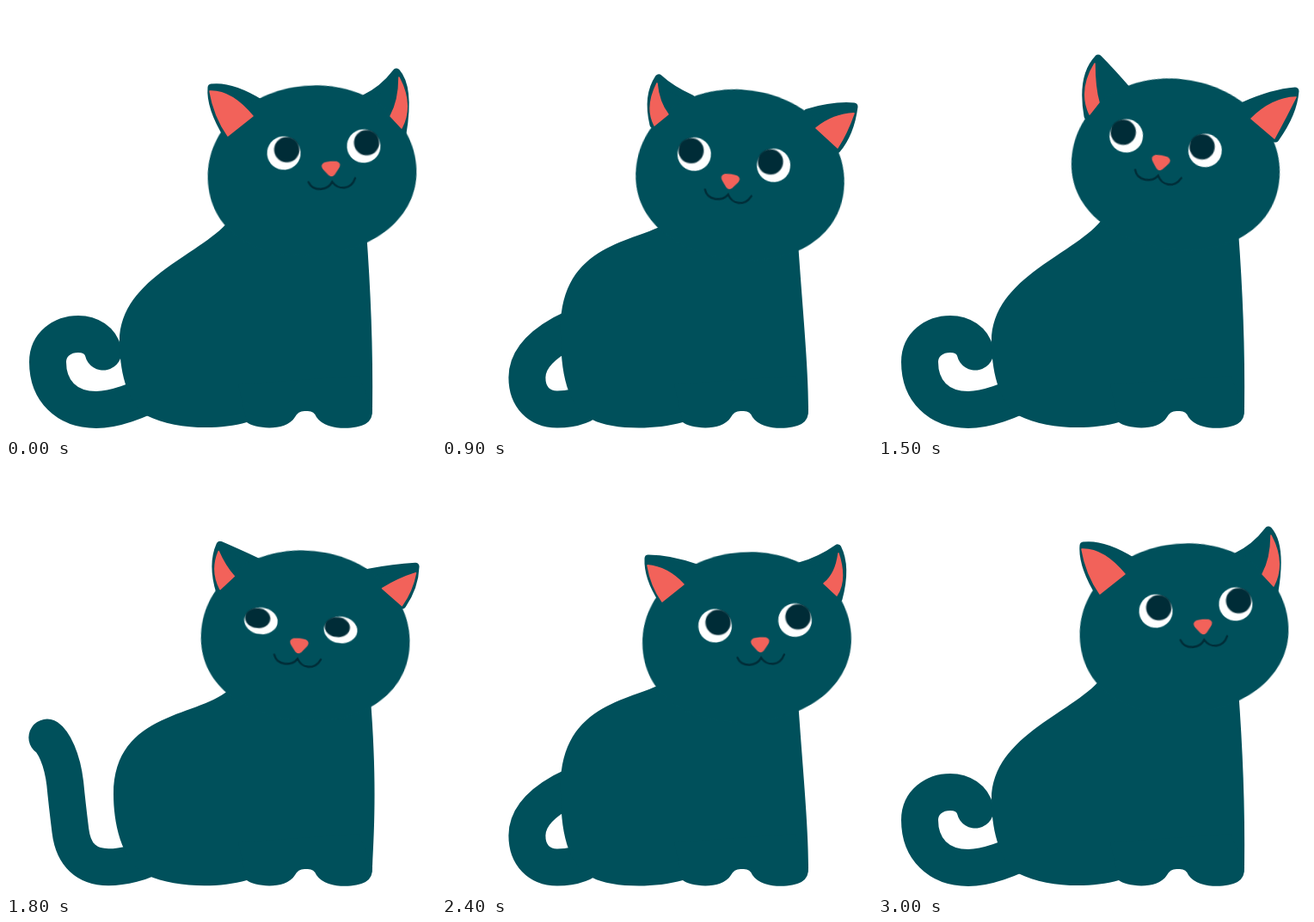
These frames come from a looping animation (500x500 px, 3050 ms). An HTML page without scripts:

```html
<!DOCTYPE html>
<html lang="en">
<head>
<meta charset="utf-8">
<title>Bouncing cat</title>
<style>
html, body { margin: 0; width: 100%; height: 100%; overflow: hidden; background: #fff; }
svg { display: block; width: 100vw; height: 100vh; }

.fur { fill: #00505b; }
.pink { fill: #f2625a; stroke: #f2625a; stroke-width: 1.5; stroke-linejoin: round; }
.dark { fill: #002c37; }
.white { fill: #fff; }
.line { fill: none; stroke: #002c37; stroke-linecap: round; }
#tail { fill: none; stroke: #00505b; stroke-width: 43; stroke-linecap: round; }
#ears { stroke: #00505b; stroke-width: 9; stroke-linejoin: round; }

/* default easing settles; keyframes that start a move override it */
#tail, #body, #head, #ears, #inner, #eyes, #muzzle, .pupil, .lid, .open, .shut {
  animation: 3.05s cubic-bezier(.2,.5,.4,1) infinite;
}
#tail { animation-name: tail; animation-timing-function: linear; }
#body { animation-name: body; }
#head { animation-name: head; }
#ears { animation-name: ears; }
#inner { animation-name: inner; }
#eyes { animation-name: eyes; }
#muzzle { animation-name: muzzle; }
.pupil { animation-name: pupil; animation-timing-function: ease-in-out; }
.lid { animation-name: lid; animation-timing-function: linear; }
.open { animation-name: open; animation-timing-function: step-end; }
.shut { animation-name: shut; animation-timing-function: step-end; }

@keyframes tail {
  0%, 49.18%, 98.361%, 100% { d: path("M175,447 C155,459 125,469.5 105,469.5 C70,469.5 48.5,447 48.5,414 C48.5,393 66,381.5 84,381.5 C98,381.5 110,389 113,402"); animation-timing-function: ease-in; }
  6.557%, 55.738% { d: path("M175,451 C158,463 124,469.5 108,469.5 C84,469.5 67,455 60,428 C55,408 48,390 46,368 C43,340 48,322 64,312"); }
  13.115%, 62.295% { d: path("M175,455 C160,465 145,468 130,468 C104,468 89.5,455 89.5,425 C89.5,405 93,395 91,375 C87,344 62,324 32,324"); }
  18.033%, 67.213% { d: path("M175,455 C160,465 150,469 133,469 C112,469 99.5,455 99.5,436 C99.5,412 118,403 126,385 C139,350 112,322 76,343"); }
  29.508%, 78.689% { d: path("M175,455 C165,465 150,469 134,469 C113,469 99,455 99,432 C99,412 115,395 140,381 C155,373 170,368 180,365"); }
  40.984%, 90.164% { d: path("M175,450 C158,462 128,470 110,470 C82,470 65.5,450 65.5,425 C65.5,396 88,371 112,371 C126,371 138,378 143,390"); animation-timing-function: ease-out; }
}
@keyframes body {
  0%, 49.18%, 98.361%, 100% { d: path("M300,220 L262,246 C233,288 132,314 132,390 C132,420 139,460 163,476 C195,492 245,494 280,484 L300,450 L400,450 L426,468 C427,400 424,330 419,262 Z"); animation-timing-function: cubic-bezier(.5,0,.75,.6); }
  13.115%, 62.295% { d: path("M300,220 L262,270 C225,300 120,265 120,380 C120,410 128,462 165,480 C195,492 245,494 280,484 L300,450 L400,450 L426,468 C430,430 436,385 427,275 Z"); }
  18.033%, 67.213% { d: path("M300,220 L262,272 C205,277 122,262 122,375 C122,415 136,462 170,481 C195,492 245,494 280,484 L300,450 L400,450 L426,468 C430,420 429,340 424,280 Z"); animation-timing-function: cubic-bezier(.45,0,.8,.7); }
  29.508%, 78.689% { d: path("M300,220 L262,252 C225,275 138,275 138,375 C138,410 140,465 175,481 C195,492 245,494 280,484 L300,450 L400,450 L426,468 C426,420 419,350 414,275 Z"); }
  40.984%, 90.164% { d: path("M300,220 L262,246 C233,288 132,314 132,390 C132,420 139,460 163,476 C195,492 245,494 280,484 L300,450 L400,450 L426,468 C427,400 424,330 419,262 Z"); }
}
@keyframes head {
  0%, 90.164%, 100% { transform: translate(356px,196px) rotate(-5deg); animation-timing-function: cubic-bezier(.5,0,.75,.6); }
  13.115% { transform: translate(354px,212.5px) rotate(-2deg); }
  18.033% { transform: translate(351px,216px) rotate(.5deg); animation-timing-function: cubic-bezier(.45,0,.8,.7); }
  29.508% { transform: translate(346.5px,201px) rotate(8deg); }
  40.984%, 49.18% { transform: translate(346px,188.5px) rotate(10deg); animation-timing-function: cubic-bezier(.5,0,.5,1); }
  67.213% { transform: translate(349.5px,215px) rotate(3deg); animation-timing-function: cubic-bezier(.45,0,.8,.7); }
  78.689% { transform: translate(354.5px,206px) rotate(-4deg); }
}
@keyframes ears {
  0%, 90.164%, 100% { d: path("M296,113 Q262,92 239,95 Q237,118 258,152 Z M416,108 Q438,98 454,77 Q470,95 461,148 Z"); animation-timing-function: cubic-bezier(.5,0,.75,.6); }
  13.115% { d: path("M292,126 Q265,122 241,119 Q240,140 252,165 Z M420,125 Q445,119 465,112 Q471,135 461,163 Z"); }
  18.033% { d: path("M293,126 Q267,122 243,118 Q241,141 252,164 Z M420,130 Q445,126 468,123 Q471,145 460,168 Z"); animation-timing-function: cubic-bezier(.45,0,.8,.7); }
  29.508% { d: path("M290,108 Q266,97 252,84 Q238,105 246,138 Z M425,124 Q455,115 479,117 Q475,148 459,167 Z"); }
  40.984%, 49.18% { d: path("M290,98 Q270,75 256,61 Q236,82 244,128 Z M425,116 Q459,101 485,99 Q483,125 462,154 Z"); animation-timing-function: cubic-bezier(.5,0,.5,1); }
  67.213% { d: path("M295,125 Q268,122 244,117 Q241,140 252,163 Z M420,133 Q445,134 470,133 Q470,155 460,171 Z"); animation-timing-function: cubic-bezier(.45,0,.8,.7); }
  78.689% { d: path("M296,121 Q265,110 240,110 Q239,132 256,158 Z M416,119 Q440,112 460,98 Q471,120 461,157 Z"); }
}
@keyframes inner {
  0%, 90.164%, 100% { d: path("M237,99 Q262,98 287,128 L258,151 Q242,128 237,99 Z M457,83 Q457,110 447,128 L460,142 Q474,115 457,83 Z"); animation-timing-function: cubic-bezier(.5,0,.75,.6); }
  13.115% { d: path("M240,127 Q258,130 276,145 L256,164 Q244,148 240,127 Z M465,120 Q455,138 441,145 L459,160 Q470,140 465,120 Z"); }
  18.033% { d: path("M242,126 Q257,131 274,144 L254,163 Q243,146 242,126 Z M468,131 Q455,144 440,150 L460,167 Q472,150 468,131 Z"); animation-timing-function: cubic-bezier(.45,0,.8,.7); }
  29.508% { d: path("M250,90 Q252,112 263,126 L247,139 Q236,118 250,90 Z M479,125 Q455,126 435,142 L460,165 Q471,148 479,125 Z"); }
  40.984%, 49.18% { d: path("M252,67 Q252,95 257,112 L246,126 Q233,98 252,67 Z M486,106 Q458,107 434,131 L461,154 Q474,130 486,106 Z"); animation-timing-function: cubic-bezier(.5,0,.5,1); }
  67.213% { d: path("M244,125 Q256,134 271,143 L251,159 Q241,142 244,125 Z M470,141 Q455,151 440,154 L460,172 Q472,158 470,141 Z"); animation-timing-function: cubic-bezier(.45,0,.8,.7); }
  78.689% { d: path("M239,118 Q262,120 281,140 L256,160 Q243,142 239,118 Z M461,104 Q458,128 444,139 L459,153 Q471,135 461,104 Z"); }
}
@keyframes eyes {
  0%, 90.164%, 100% { transform: translate(369.5px,167px) rotate(-5deg); animation-timing-function: cubic-bezier(.5,0,.75,.6); }
  13.115% { transform: translate(358.5px,197px) rotate(-2deg); }
  18.033% { transform: translate(355px,207px) rotate(.5deg); animation-timing-function: cubic-bezier(.45,0,.8,.7); }
  29.508% { transform: translate(339.5px,179px) rotate(8deg); }
  40.984%, 49.18% { transform: translate(334.5px,159.5px) rotate(10.5deg); animation-timing-function: cubic-bezier(.5,0,.5,1); }
  67.213% { transform: translate(348.5px,207px) rotate(3.7deg); animation-timing-function: cubic-bezier(.45,0,.8,.7); }
  78.689% { transform: translate(364px,185px) rotate(-4deg); }
}
@keyframes muzzle {
  0%, 90.164%, 100% { transform: translate(378px,189px) rotate(-5deg); animation-timing-function: cubic-bezier(.5,0,.75,.6); }
  13.115% { transform: translate(363px,222px) rotate(-1deg); }
  18.033% { transform: translate(358px,230px) rotate(.5deg); animation-timing-function: cubic-bezier(.45,0,.8,.7); }
  29.508% { transform: translate(335px,204px) rotate(8deg); }
  40.984%, 49.18% { transform: translate(328.5px,182px) rotate(10deg); animation-timing-function: cubic-bezier(.5,0,.5,1); }
  67.213% { transform: translate(349px,231px) rotate(3deg); animation-timing-function: cubic-bezier(.45,0,.8,.7); }
  78.689% { transform: translate(370px,210px) rotate(-4deg); }
}
@keyframes pupil {
  0%, 13.115%, 78.689%, 100% { transform: translate(3.7px,-3.7px); }
  29.508%, 62.295% { transform: translate(-4.2px,-3.6px); }
}
@keyframes lid {
  0%, 6.557%, 27.869%, 55.738%, 77.049%, 100% { transform: scaleY(1); }
  13.115%, 62.295% { transform: scaleY(.59); }
  16.393%, 22.951%, 65.574%, 72.131% { transform: scaleY(.15); }
}
@keyframes open {
  0%, 22.951%, 72.131%, 100% { opacity: 1; }
  16.393%, 65.574% { opacity: 0; }
}
@keyframes shut {
  0%, 22.951%, 72.131%, 100% { opacity: 0; }
  16.393%, 65.574% { opacity: 1; }
}
</style>
</head>
<body>
<svg viewBox="0 0 500 500">
  <path id="tail"/>
  <path id="body" class="fur"/>
  <path class="fur" d="M270,440 L280,484 C288,491 325,496 336,478 Q340,470 349,471 Q358,470 361,478 C372,494 405,493 418,486 Q427,481 426,468 L410,430 Z"/>
  <path id="ears" class="fur"/>
  <path id="head" class="fur" d="M-121.5,0 C-121.5,-60 -67,-103.5 0,-103.5 S121.5,-60 121.5,0 C121.5,55 70,94 0,94 C-72,94 -121.5,58 -121.5,0 Z"/>
  <path id="inner" class="pink"/>

  <g id="eyes">
    <g transform="translate(-46.6 0)">
      <g class="open"><g class="lid">
        <circle class="white" r="19.5"/>
        <circle class="dark pupil" r="14.7"/>
      </g></g>
      <path class="line shut" stroke-width="4" d="M-20,3 C-11,-5.5 11,-5.5 20,3"/>
    </g>
    <g transform="translate(46.6 0)">
      <g class="open"><g class="lid">
        <circle class="white" r="19.5"/>
        <circle class="dark pupil" r="14.7"/>
      </g></g>
      <path class="line shut" stroke-width="4" d="M-20,3 C-11,-5.5 11,-5.5 20,3"/>
    </g>
  </g>

  <g id="muzzle">
    <path class="line" stroke-width="2.4" d="M-27.5,13.5 C-23,26 -6,25 0,15.5 C6,26 21,27 27,13.5"/>
    <path class="pink" d="M-7,-7 Q0,-8.5 7,-7 Q12,-5 8.5,0 L3,7 Q0,10 -3,7 L-8.5,0 Q-12,-5 -7,-7 Z"/>
  </g>
</svg>
</body>
</html>
```
